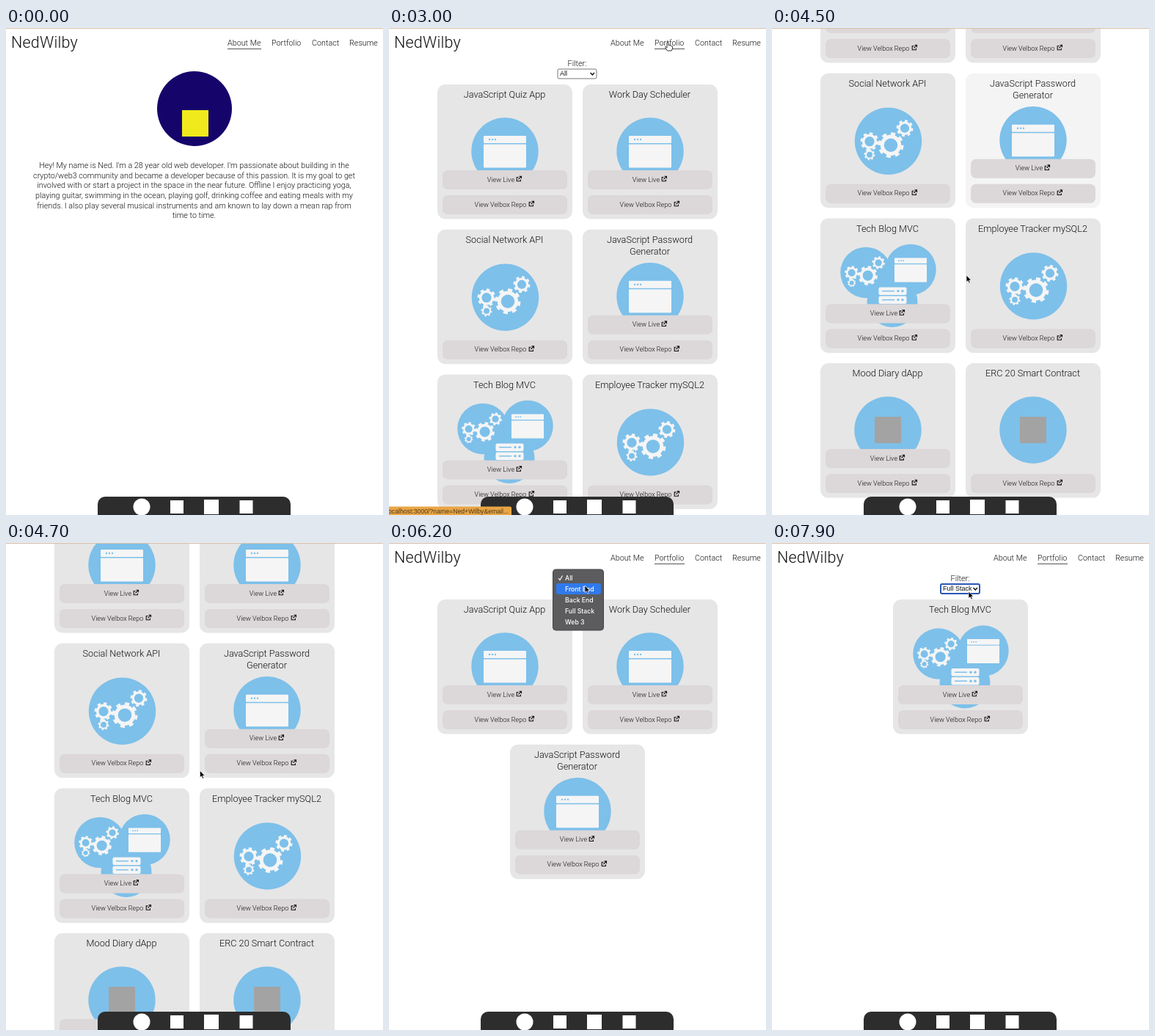
These frames come from a looping animation (514x664 px, 8 s). An HTML page:

```html
<!DOCTYPE html>
<html lang="en">
<head>
<meta charset="utf-8">
<title>Portfolio</title>
<style>
html, body { margin: 0; width: 514px; height: 664px; overflow: hidden; background: #fff; }
svg { display: block; }
text { font: 300 10.75px Roboto, sans-serif; fill: #111; }
.mid { text-anchor: middle; }
.logo { font-size: 21.5px; letter-spacing: .2px; }
.title { font-size: 12.7px; }
.button { font-size: 9.1px; }
.select { font: 9px "Liberation Sans", Arial, sans-serif; }
.menu { font: 500 8.7px Inter, sans-serif; fill: #fff; }
.status { font: 8.7px "Liberation Sans", Arial, sans-serif; fill: #4d3a1e; }
</style>
</head>
<body>
<svg id="stage" width="514" height="664" viewBox="0 0 514 664"></svg>
<script>
const LOOP = 8000, STEP = 100;
const BLUE = '#7dc0ea';
const stage = document.getElementById('stage');

const bio = [
  "Hey! My name is Ned. I'm a 28 year old web developer. I'm passionate about building in the",
  'crypto/web3 community and became a developer because of this passion. It is my goal to get',
  'involved with or start a project in the space in the near future. Offline I enjoy practicing yoga,',
  'playing guitar, swimming in the ocean, playing golf, drinking coffee and eating meals with my',
  'friends. I also play several musical instruments and am known to lay down a mean rap from',
  'time to time.'
];
const nav = [['About Me', 302, 46], ['Portfolio', 362, 41], ['Contact', 417, 37], ['Resume', 468, 38]];
const filters = ['All', 'Front End', 'Back End', 'Full Stack', 'Web 3'];

// title lines, filter index, has a live link
const projects = [
  [['JavaScript Quiz App'], 1, true],
  [['Work Day Scheduler'], 1, true],
  [['Social Network API'], 2, false],
  [['JavaScript Password', 'Generator'], 1, true],
  [['Tech Blog MVC'], 3, true],
  [['Employee Tracker mySQL2'], 2, false],
  [['Mood Diary dApp'], 4, true],
  [['ERC 20 Smart Contract'], 4, false]
];

// pointer path: time, x, y
const path = [
  [100, 312, 652], [300, 190, 380], [500, 70, 60], [700, 14, 14], [900, 30, 150],
  [1100, 38, 290], [1400, 69, 325], [1600, 190, 180], [1800, 338, 18], [2000, 290, 120],
  [2200, 210, 218], [2400, 330, 90], [2500, 380, 19], [3200, 380, 19], [3500, 330, 200],
  [3800, 265, 337], [4600, 265, 337], [5100, 259, 80], [5300, 262, 60], [5500, 262, 60],
  [5700, 262, 75], [6000, 264, 60], [6200, 267, 58], [6500, 266, 74], [6800, 264, 60],
  [7000, 264, 61], [7300, 266, 76], [7600, 268, 66], [7900, 268, 66]
];
const openTimes = [[5500, 5700], [6100, 6500], [7000, 7300]];

const ease = (t, a, b) => {
  const p = Math.min(1, Math.max(0, (t - a) / (b - a)));
  return p * p * (3 - 2 * p);
};
const text = (x, y, s, cls = '') => `<text x="${x}" y="${y}" class="${cls}">${s}</text>`;
const rect = (x, y, w, h, fill, r = 0, extra = '') =>
  `<rect x="${x}" y="${y}" width="${w}" height="${h}" rx="${r}" fill="${fill}" ${extra}/>`;
const disc = (x, y, r, fill) => `<circle cx="${x}" cy="${y}" r="${r}" fill="${fill}"/>`;
const at = (x, y, body, scale = 1) => `<g transform="translate(${x} ${y}) scale(${scale})">${body}</g>`;

function pointerAt(t) {
  const i = path.findIndex(k => k[0] > t);
  if (i < 0) return path[path.length - 1].slice(1);
  const [a, b] = [path[i - 1], path[i]], p = ease(t, a[0], b[0]);
  return [a[1] + (b[1] - a[1]) * p, a[2] + (b[2] - a[2]) * p];
}

const ring = (x, y, r, w, extra = '') =>
  `<circle cx="${x}" cy="${y}" r="${r}" fill="none" stroke="#f5f5f5" stroke-width="${w}" ${extra}/>`;
const gear = (x, y, r) => ring(x, y, r * .67, r * .28) +
  ring(x, y, r * .88, r * .24, 'pathLength="16" stroke-dasharray="1"');

const gears = disc(0, 0, 45.7, BLUE) + gear(3.5, 5.5, 17.5) + gear(-25.5, .5, 12.5) +
  gear(-25.5, 18.5, 7.5) + gear(22.5, -17.5, 11.5);
const browser = disc(0, 0, 45.7, BLUE) + rect(-29, -21, 58, 10, '#f5f5f5', 1) +
  rect(-29, -9.5, 58, 32, '#f5f5f5', 1) + [-21, -17, -13].map(x => disc(x, -16, 1.2, BLUE)).join('');
const serverRow = y => rect(-18.5, y, 38, 10.5, '#f5f5f5', 2) +
  rect(-14, y + 4.5, 17, 1.5, BLUE) + disc(8, y + 5.2, 1.7, BLUE) + disc(14, y + 5.2, 1.7, BLUE);
const stack = at(98, 114, disc(0, 0, 34.5, BLUE)) + at(62, 74, gears, .76) +
  at(123, 70, browser, .76) + at(98, 94, serverRow(0) + serverRow(12));
const coin = disc(0, 0, 45.7, BLUE) + rect(-18, -18, 36, 36, '#a3a3a3');
const art = [null, at(92, 91, browser), at(92.5, 92.5, gears), stack, at(92, 91, coin)];

const linkIcon = '<path d="M3.5 2H1.2V7.3H6.4V5M4.5 .7H7.5V3.7M7.3 .9L3.4 4.8" fill="none" stroke="#111" stroke-width="1.1"/>';
const button = (y, label, center, iconX) => rect(7, y, 170, 26, '#dcd7d8', 7) +
  text(center, y + 15.6, label, 'button mid') + at(iconX, y + 7.5, linkIcon);

function card([lines, kind, live], x, y, hover) {
  return at(x, y, rect(0, 0, 184, 183.5, hover ? '#f4f4f4' : '#e6e6e6', 11) + art[kind] +
    lines.map((s, i) => text(91.5, 18.2 + i * 16, s, 'title mid')).join('') +
    (live ? button(117, 'View Live', 86.5, 107) : '') +
    button(151, 'View Velbox Repo', 86, 124));
}

function cards(filter, hovered) {
  const list = projects.filter(p => !filter || p[1] === filter);
  return list.map((p, i) => {
    const alone = i % 2 === 0 && i === list.length - 1;
    const x = alone ? 165 : i % 2 ? 264 : 66;
    return card(p, x, 77 + 197.7 * (i >> 1), p === hovered);
  }).join('');
}

function select(filter, focused) {
  const border = focused ? 'stroke="#2b57b8" stroke-width="2"' : 'stroke="#767676"';
  return text(256.5, 51.5, 'Filter:', 'mid') + rect(230, 56, 53, 13, '#fff', 2, border) +
    text(233, 65.3, filters[filter], 'select') +
    '<path d="M274.5 61L277.3 64L280 61" fill="none" stroke="#111" stroke-width="1.5"/>';
}

function menu(checked, y) {
  const top = 62.5 - 15 * checked;
  const over = Math.round((y - 62) / 15) + checked;
  return rect(223.5, top - 11.5, 69, 83, '#5c5c5e', 4, 'stroke="#444"') +
    rect(228, top + 15 * over - 7.5, 61, 15, '#3079ec', 3) +
    filters.map((s, i) => text(240, top + 3.2 + 15 * i, s, 'menu')).join('') +
    `<path d="M231 ${top + .5}l2 2.5l3.5 -6" fill="none" stroke="#fff" stroke-width="1.2"/>`;
}

function header(active) {
  const [, x, w] = nav[active];
  return text(7, 27, 'NedWilby', 'logo') + nav.map(n => text(n[1], 24, n[0])).join('') +
    rect(x, 28, w, 1, '#555');
}

const about = disc(257, 110, 51, '#15056b') + rect(240, 112, 36, 36, '#f0ea1c') +
  bio.map((s, i) => text(256.5, 191.2 + i * 13.6, s, 'mid')).join('');
const footer = rect(125, 639, 263, 40, '#2d2d2d', 10) + disc(185, 653, 11.5, '#fff') +
  rect(224, 644, 18, 18, '#fff') + rect(270, 643, 20, 20, '#fff') + rect(318.5, 644, 18, 18, '#fff');
const status = rect(-4, 652.5, 171, 14, '#e9a544', 2) +
  text(-1, 661.5, 'ocalhost:3000/?name=Ned+Wilby&amp;email...', 'status');
const arrow = '<path d="M0 0V9.5L2.2 7.6L3.7 11L5.3 10.3L3.8 7H6.6Z" fill="#000" stroke="#fff" stroke-width=".7"/>';
const hand = '<path d="M-1 6V1Q0 -.5 1 1V4.5Q2.5 3.5 3 5Q4.5 4.2 5 5.6Q6.5 5.2 6.5 7V9L5.3 12H-.5L-3.5 7.5Q-3.5 6 -2.3 6.6L-1 8Z" fill="#fff" stroke="#222" stroke-width=".9"/>';

function draw(t) {
  const portfolio = t >= 2800;
  const filter = t < 5800 ? 0 : t < 6600 ? 1 : t < 7400 ? 2 : 3;
  const scroll = 213 * (ease(t, 3700, 4300) - ease(t, 4500, 5000));
  const hovered = t >= 3800 && t <= 4500 ? projects[3] : null;
  const [x, y] = t < 100 ? [-50, -50] : pointerAt(t);
  const isOpen = openTimes.some(([a, b]) => t >= a && t <= b);
  const page = portfolio ? select(filter, t >= 5500) + cards(filter, hovered) : about;

  stage.innerHTML = at(0, -scroll, header(+portfolio) + page) + footer +
    (t >= 2700 && t < 3600 ? status : '') + (isOpen ? menu(filter, y) : '') +
    rect(0, 0, 514, 1, '#dcc0a8') + at(x, y, x > 300 && y < 30 ? hand : arrow);
}

let last = -1;
function tick(now) {
  const t = Math.floor(now % LOOP / STEP) * STEP;
  if (t !== last) draw(last = t);
  requestAnimationFrame(tick);
}
draw(0);
requestAnimationFrame(tick);
</script>
</body>
</html>
```
